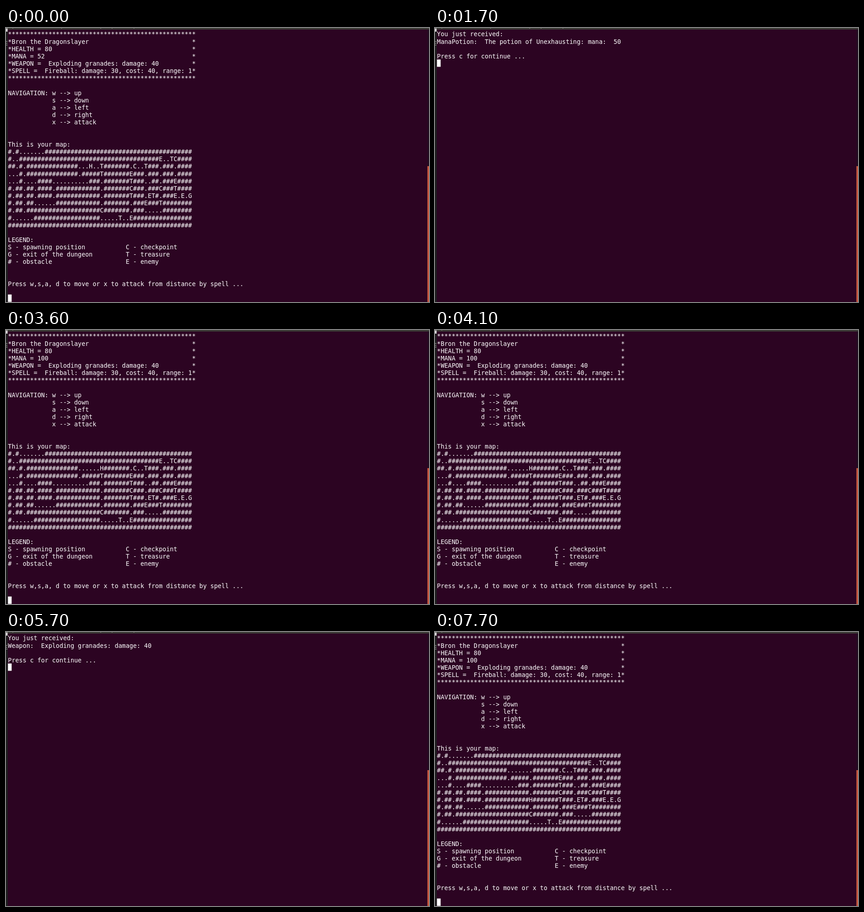
Recreate the animation shown at these times as an HTML page with a canvas. Size 929 by 603 pixels, loop 8000 ms.

```html
<!DOCTYPE html>
<html lang="en">
<head>
<meta charset="utf-8">
<title>Dungeon terminal</title>
<style>
  html, body { margin: 0; width: 100%; height: 100%; overflow: hidden; background: #2c0422; }
  canvas { display: block; }
</style>
</head>
<body>
<canvas id="stage" width="929" height="603"></canvas>
<script>
const ctx = document.getElementById('stage').getContext('2d');
const LOOP = 8000;

// The terminal is a 9 x 18 cell grid shown slightly reduced.
const SCALE = 0.898, CELL_W = 9, CELL_H = 18, LEFT = 4.3, BASELINE = 18.4;
const MAP_ROW = 16;

const MAP = [
  '#.#.......' + '#'.repeat(40),
  '#..' + '#'.repeat(38) + 'E..TC####',
  '##.#.##############.......#######.C..T###.###.####',
  '...#.##############.#####.#######E###.###.###.####',
  '...#....####..........###.#######T###..##.###E####',
  '#.##.##.####.############.#######C###.###C###T####',
  '#.##.##.####.############.#######T###.ET#.###E.E.G',
  '#.##.##......############.#######.###E###T########',
  '#.##.####################C#######.###.....########',
  '#......##################.....T..E################',
  '#'.repeat(50)
];

const put = (line, col, ch) => line.slice(0, col) + ch + line.slice(col + 1);
const boxed = text => ('*' + text).padEnd(50) + '*';
const legend = (left, right) => left.padEnd(32) + right;

function dungeon(col, row, mana, treasures) {
  const map = MAP.slice();
  if (treasures > 1) map[2] = put(map[2], 25, 'T');
  if (treasures > 0) map[3] = put(map[3], 25, 'T');
  map[row] = put(map[row], col, 'H');
  const key = (k, action) => ' '.repeat(12) + k + ' --> ' + action;
  return [
    '*'.repeat(51),
    boxed('Bron the Dragonslayer'),
    boxed('HEALTH = 80'),
    boxed('MANA = ' + mana),
    boxed('WEAPON =  Exploding granades: damage: 40'),
    boxed('SPELL =  Fireball: damage: 30, cost: 40, range: 1'),
    '*'.repeat(51),
    '',
    'NAVIGATION: w --> up',
    key('s', 'down'), key('a', 'left'), key('d', 'right'), key('x', 'attack'),
    '', '',
    'This is your map:',
    ...map,
    '',
    'LEGEND:',
    legend('S - spawning position', 'C - checkpoint'),
    legend('G - exit of the dungeon', 'T - treasure'),
    legend('# - obstacle', 'E - enemy'),
    '', '',
    'Press w,s,a, d to move or x to attack from distance by spell ...',
    '', ''
  ];
}

const received = item => ['You just received:', item, '', 'Press c for continue ...', ''];

// Each entry: start time in ms, then the lines on screen.
const SCREENS = [
  [0, dungeon(22, 2, 52, 2)],
  [800, dungeon(23, 2, 54, 2)],
  [1000, dungeon(24, 2, 56, 2)],
  [1700, received('ManaPotion:  The potion of Unexhausting: mana:  50')],
  [3600, dungeon(25, 2, 100, 1)],
  [4500, received('Weapon:  Exploding granades: damage: 40')],
  [6200, dungeon(25, 3, 100, 0)],
  [6900, dungeon(25, 4, 100, 0)],
  [7200, dungeon(25, 5, 100, 0)],
  [7700, dungeon(25, 6, 100, 0)]
];

// The cursor starts visible and flips at each of these times.
const BLINKS = [100, 700, 1600, 1700, 2200, 2800, 3400, 3500, 4100, 4500, 5100, 5700, 6700, 6900];

function rect(color, x, y, w, h) {
  ctx.fillStyle = color;
  ctx.fillRect(x, y, w, h);
}

function drawWindow() {
  rect('#2c0422', 0, 0, 929, 603);
  rect('#1f1d1f', 0, 0, 4, 603);
  rect('#3c3b37', 0, 0, 929, 3.4);
  rect('#d8d4d8', 0, 1, 3.5, 7);
  ctx.fillStyle = '#aaa6a6';
  ctx.font = '12px "DejaVu Sans", sans-serif';
  ctx.fillText('E', -3.5, 38);
  for (const x of [14, 121, 207, 232, 280]) rect('#8b8983', x, 0, 2, 1);
  rect('#220b20', 925.5, 3.4, 3.5, 301);
  rect('#c75a40', 925.5, 304, 3.5, 299);
}

function drawText(lines) {
  ctx.save();
  ctx.translate(LEFT, BASELINE);
  ctx.scale(SCALE, SCALE);
  ctx.font = '15px "DejaVu Sans Mono", monospace';
  ctx.fillStyle = '#fff';
  lines.forEach((line, row) => {
    for (let col = 0; col < line.length; col++) {
      if (line[col] !== ' ') ctx.fillText(line[col], col * CELL_W, row * CELL_H);
    }
  });
  ctx.restore();
}

function draw(t) {
  const lines = SCREENS.filter(([start]) => start <= t).pop()[1];
  const cursorOn = BLINKS.filter(flip => flip <= t).length % 2 === 0;
  drawWindow();
  drawText(lines);
  if (cursorOn) {
    const y = 4.6 + (lines.length - 1) * CELL_H * SCALE;
    rect('#fff', LEFT, y, CELL_W * SCALE, CELL_H * SCALE);
  }
}

function tick() {
  draw(performance.now() % LOOP);
  requestAnimationFrame(tick);
}
tick();
</script>
</body>
</html>
```
